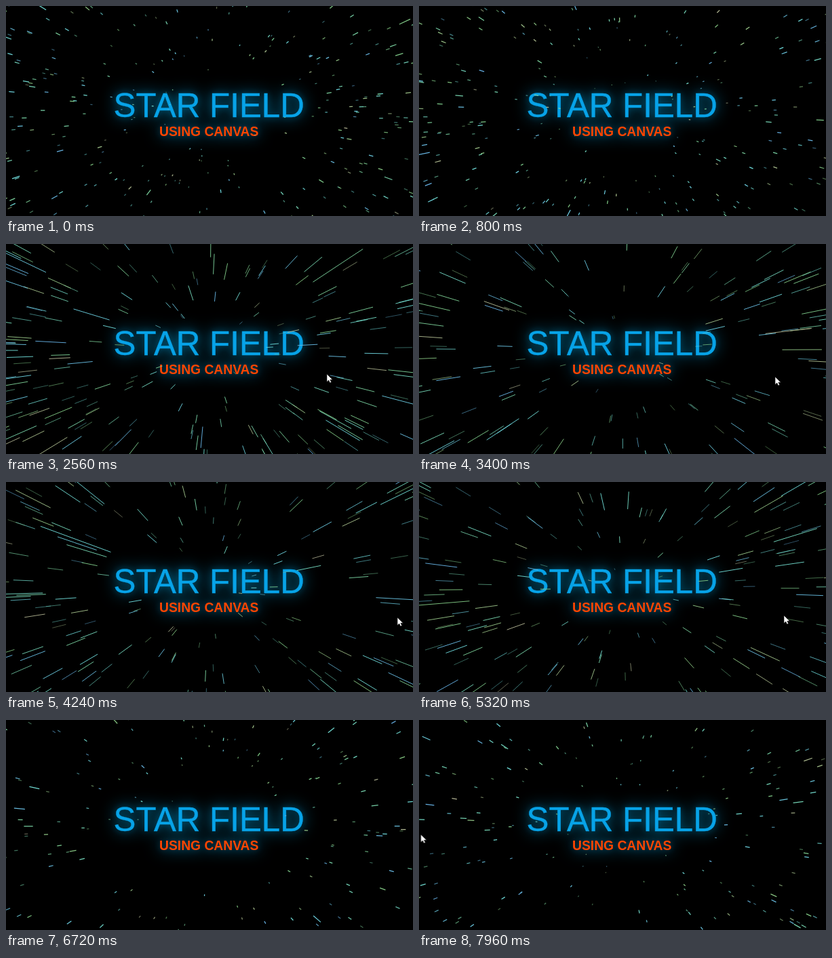
Write an HTML page with a canvas that moves like this. It is 600 by 310 pixels and loops after 8000 ms.

```html
<!DOCTYPE html>
<html lang="en">
<head>
<meta charset="utf-8">
<title>Star field</title>
<style>
  html, body { margin: 0; width: 100%; height: 100%; overflow: hidden; background: #000; }
  svg, canvas { position: absolute; left: 0; top: 0; width: 600px; height: 310px; }
  text { font-family: "Liberation Sans", Arial, sans-serif; text-anchor: middle; }
  .title { font-size: 49.3px; fill: #07a3e8; stroke: #07a3e8; stroke-width: .4; }
  .subtitle { font-size: 19.3px; font-weight: bold; fill: #ff4500; }
  .glow { filter: drop-shadow(0 0 5px rgba(0, 135, 185, .35)) drop-shadow(0 0 11px rgba(0, 135, 185, .85)); }
  #cursor { fill: #fff; stroke: #111; stroke-width: .6; }
</style>
</head>
<body>
<svg viewBox="0 0 600 310">
  <g class="glow">
    <text class="title" x="299.2" y="163.5">STAR FIELD</text>
    <text class="subtitle" x="299.2" y="191.5">USING CANVAS</text>
  </g>
</svg>
<canvas id="sky" width="600" height="310"></canvas>
<svg viewBox="0 0 600 310">
  <path id="cursor" d="M0 0V11.5L2.7 9.1L4.6 13L6.6 12.1L4.8 8.3H8.4Z"/>
</svg>
<script>
const LOOP = 8000, STEP = 40, COUNT = 1150;
const CENTER = { x: 300, y: 157 };

const ctx = document.getElementById('sky').getContext('2d');
const cursor = document.getElementById('cursor');

// Smooth rise from 0 to 1 between two times
function ease(t, from, to) {
  const p = Math.min(1, Math.max(0, (t - from) / (to - from)));
  return p * p * (3 - 2 * p);
}

const warp = t => ease(t, 1560, 2500) * (1 - ease(t, 5900, 6650));
const streakDepth = t => .018 + .075 * warp(t);
const density = t => 1 - .5 * ease(t, 1700, 3000) + .2 * ease(t, 6700, 8000);

// Pointer enters from the left, drifts over the field, leaves and comes back
const pointerMoves = cursor.animate([
  [1440, -12, 170], [1640, 245, 181], [2560, 473, 192], [4240, 577, 200],
  [5320, 538, 197], [6000, -12, 172], [7880, -12, 169], [8000, 10, 169]
].map(([time, x, y]) => ({ offset: time / LOOP, transform: `translate(${x}px, ${y}px)` })),
  { duration: LOOP, iterations: Infinity });
pointerMoves.pause();
cursor.style.transform = 'translate(-12px, 170px)';

// Depth travelled at the start of every step
const travelled = [0];
for (let t = 0; t < LOOP; t += STEP) {
  travelled.push(travelled[travelled.length - 1] + streakDepth(t) * 1.2);
}

function random(seed) {
  let n = Math.imul(seed ^ (seed >>> 16), 0x45d9f3b);
  n = Math.imul(n ^ (n >>> 16), 0x45d9f3b);
  return ((n ^ (n >>> 16)) >>> 0) / 4294967296;
}

function drawStar(index, distance, streak) {
  const depth = random(index * 7 + 3) + 100 - distance;
  const cycle = Math.floor(depth), z = depth - cycle;
  if (z < .02) return;
  const seed = index * 4099 + cycle * 31 + 17;
  const angle = random(seed) * Math.PI * 2;
  const radius = 30 + 300 * Math.sqrt(random(seed + 1));
  const x = Math.cos(angle) * radius, y = Math.sin(angle) * radius * .75;
  const far = z + streak;
  if (Math.abs(x / far) > 310 || Math.abs(y / far) > 165) return;

  const hue = 55 + 150 * Math.sqrt(random(index + 50000));
  const saturation = 15 + (hue - 55) * .35;
  ctx.globalAlpha = Math.min(1, .45 + (1 - z) * 2);
  ctx.strokeStyle = `hsl(${hue}, ${saturation}%, 64%)`;
  ctx.beginPath();
  ctx.moveTo(CENTER.x + x / far, CENTER.y + y / far);
  ctx.lineTo(CENTER.x + x / z, CENTER.y + y / z);
  ctx.stroke();
}

function render(time) {
  const step = Math.floor(time % LOOP / STEP), t = step * STEP;
  const active = COUNT * density(t), streak = streakDepth(t);
  ctx.clearRect(0, 0, 600, 310);
  ctx.lineWidth = 1.25 - .3 * warp(t);
  for (let i = 0; i < active; i++) drawStar(i, travelled[step], streak);
  pointerMoves.currentTime = t;
}

const start = performance.now();
function tick() {
  render(performance.now() - start);
  requestAnimationFrame(tick);
}
tick();
</script>
</body>
</html>
```
